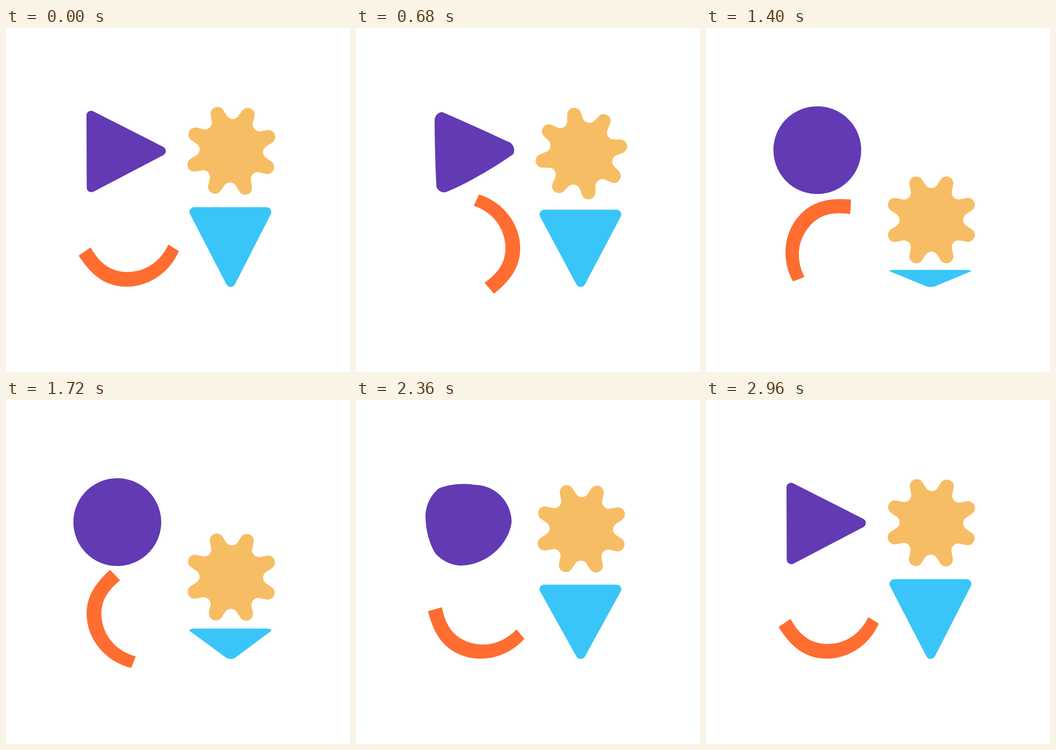
An HTML page that plays this animation: 748 by 748 pixels, repeating every 3 s.

```html
<!DOCTYPE html>
<html lang="en">
<head>
<meta charset="utf-8">
<title>Shapes</title>
<style>
html, body { margin: 0; width: 100%; height: 100%; overflow: hidden; background: #fff; }
svg { display: block; width: 100%; height: 100%; }
</style>
</head>
<body>
<svg viewBox="0 0 748 748">
  <path id="blob" fill="#623ab4"/>
  <path id="gear" fill="#f7bd64"/>
  <path id="arc" fill="#ff6d31" d="M158 495C183 533 212 562.5 263 562.5C306 562.5 353.6 536.2 376 485
    L353 471C335.5 509 302 530.5 264 530.5C227 530.5 203 511 184 477Z"/>
  <path id="cone" fill="#3ac5f8" stroke="#3ac5f8" stroke-width="21" stroke-linejoin="round"
    d="M409.5 400H566.5L488.5 552.5Z"/>
</svg>
<script>
const LOOP = 3000, STEP = 40, RAD = Math.PI / 180;
const [blob, gear, arc, cone] = ['blob', 'gear', 'arc', 'cone'].map(id => document.getElementById(id));

// Eased progress from start to end; a and b are the x values of the bezier handles.
function tween(start, end, a, b) {
  return t => {
    const x = (t - start) / (end - start);
    if (x <= 0) return 0;
    if (x >= 1) return 1;
    let lo = 0, hi = 1;
    for (let i = 0; i < 30; i++) {
      const m = (lo + hi) / 2, n = 1 - m;
      if (3 * a * n * n * m + 3 * b * n * m * m + m * m * m < x) lo = m; else hi = m;
    }
    return lo * lo * (3 - 2 * lo);
  };
}

const spinGear = tween(-48, 1448, .31, .6);
const spinArc = tween(-48, 2952, .21, .48);
const roundUp = tween(-48, 1448, .95, .625);
const sharpen = tween(1750, 2952, .96, .56);
const press = tween(350, 1450, .96, .77);
const lift = tween(1450, 2952, .3, .09);

const polar = (x, y, r, deg) => [x + r * Math.cos(deg * RAD), y + r * Math.sin(deg * RAD)];

// Flat list of bezier points around an outline of [cx, cy, r, angle] nodes.
function outline(nodes) {
  const out = [];
  nodes.forEach((p, i) => {
    const q = nodes[(i + 1) % nodes.length];
    const turn = (q[3] - p[3] + 360) % 360;
    const [x0, y0] = polar(...p), [x1, y1] = polar(...q);
    if (turn) {
      const h = 4 / 3 * Math.tan(turn / 4 * RAD) * p[2];
      out.push(x0, y0, ...polar(x0, y0, h, p[3] + 90), ...polar(x1, y1, h, q[3] - 90));
    } else {
      const dx = (x1 - x0) / 3, dy = (y1 - y0) / 3;
      out.push(x0, y0, x0 + dx, y0 + dy, x1 - dx, y1 - dy);
    }
  });
  return out;
}

const triangle = outline([
  [337.5, 267.5, 10, 297], [337.5, 267.5, 10, 63],
  [185.5, 347, 10, 63], [185.5, 347, 10, 180],
  [185, 190, 10, 180], [185, 190, 10, 297]
]);
const disc = outline([270, 0, 93, 138.6, 180, 228.2].map(a => [242, 265.5, 95.5, a]));

function blobPath(p) {
  const v = triangle.map((n, i) => (n + (disc[i] - n) * p).toFixed(2));
  let d = `M${v[0]} ${v[1]}`;
  for (let i = 2; i < v.length; i += 6) {
    d += `C${v.slice(i, i + 4)},${v[(i + 4) % v.length]},${v[(i + 5) % v.length]}`;
  }
  return d + 'Z';
}

// Eight round teeth and round valleys joined by their inner tangents.
function gearPath() {
  const r = 15, tooth = 86, valley = 84, pts = [];
  for (let k = 0; k < 8; k++) {
    const a = 45 * k - 112.5;
    const [tx, ty] = polar(0, 0, tooth, a);
    for (const side of [-1, 1]) {
      const [vx, vy] = polar(0, 0, valley, a + side * 22.5);
      const gap = Math.hypot(vx - tx, vy - ty);
      const tilt = Math.acos(2 * r / gap) / RAD;
      const dir = Math.atan2(vy - ty, vx - tx) / RAD - side * tilt;
      const onTooth = polar(tx, ty, r, dir), onValley = polar(vx, vy, r, dir + 180);
      pts.push(...(side < 0 ? [onValley, onTooth] : [onTooth, onValley]));
    }
  }
  let d = '';
  for (let i = 0; i < pts.length; i += 4) {
    const [a, b, c, e] = pts.slice(i, i + 4);
    d += i ? `A${r} ${r} 0 0 0 ${a}` : `M${a}`;
    d += `L${b}A${r} ${r} 0 0 1 ${c}L${e}`;
  }
  return d + `A${r} ${r} 0 0 0 ${pts[0]}Z`;
}

gear.setAttribute('d', gearPath());

function draw(t) {
  const squash = .8 * (press(t) - lift(t));
  const move = (el, value) => el.setAttribute('transform', value);
  move(gear, `translate(490 ${267 + 191 * squash}) rotate(${.7 + 360 * spinGear(t)})`);
  move(cone, `translate(0 563) scale(1 ${1 - squash}) translate(0 -563)`);
  move(arc, `rotate(${.7 - 360 * spinArc(t)} 266.4 472.4)`);
  blob.setAttribute('d', blobPath(roundUp(t) - sharpen(t)));
}

function tick() {
  const t = performance.now() % LOOP;
  draw(Math.floor(t / STEP) * STEP);
  requestAnimationFrame(tick);
}
tick();
</script>
</body>
</html>
```
